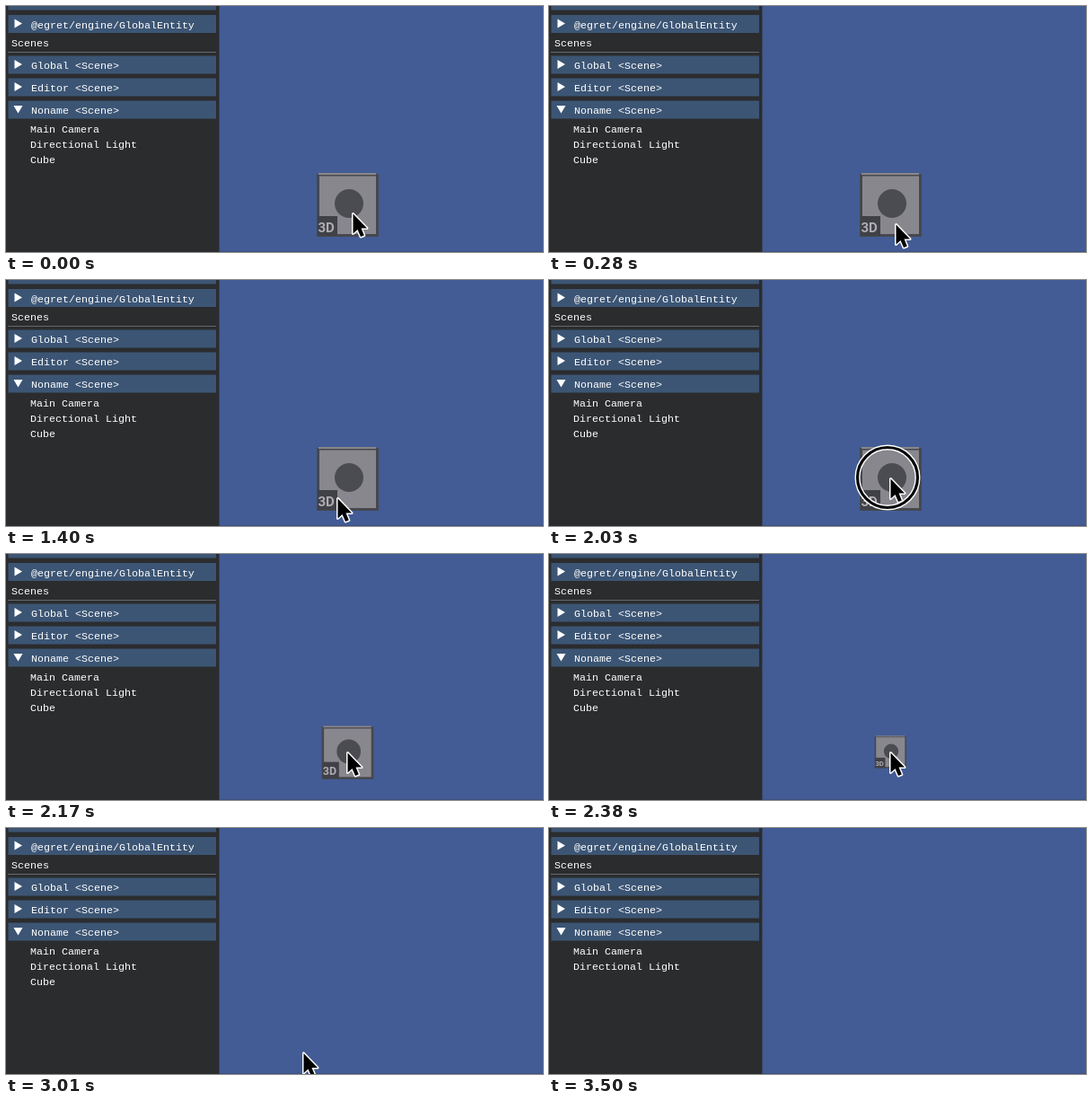
Animation, 598 px wide and 274 px high, one loop 3850 ms. Source, as an HTML page with a canvas:

```html
<!DOCTYPE html>
<html lang="en">
<head>
<meta charset="utf-8">
<title>Scene hierarchy</title>
<style>
  html, body { margin: 0; width: 100%; height: 100%; overflow: hidden; background: #435c95; }
  canvas { display: block; }
</style>
</head>
<body>
<canvas id="stage" width="598" height="274"></canvas>
<script>
const ctx = document.getElementById('stage').getContext('2d');
const LOOP = 3850, STEP = 70;
const BAR = '#3c5574', SCENE = '#435c95';
const arrow = new Path2D('M0 0V22L5 17.5L8.5 25.5L12.3 24L9 16H15.5Z');

const progress = (t, from, to) => Math.min(Math.max((t - from) / (to - from), 0), 1);
const easeOut = u => 1 - (1 - u) ** 2;

function rect(x, y, w, h, color) {
  ctx.fillStyle = color;
  ctx.fillRect(x, y, w, h);
}

function text(string, x, y, font = '11.67px "Liberation Mono", monospace', color = '#fff') {
  ctx.font = font;
  ctx.fillStyle = color;
  ctx.fillText(string, x, y);
}

function header(y, label, open) {
  rect(2.5, y + 0.5, 231.5, 20, BAR);
  ctx.save();
  ctx.translate(13.5, y + 10);
  if (open) ctx.rotate(Math.PI / 2);
  ctx.fillStyle = '#fff';
  ctx.fill(new Path2D('M-4 -5L4.5 0L-4 5Z'));
  ctx.restore();
  text(label, 28, y + 15);
}

function drawPanel(t) {
  rect(0, 0, 237.5, 274, '#2b2c2e');
  rect(2.5, 0, 231.5, 4.5, BAR);
  header(9.5, '@egret/engine/GlobalEntity');
  text('Scenes', 6, 45);
  rect(2, 51, 232, 1, '#66686c');
  ['Global', 'Editor', 'Noname'].forEach((name, i) =>
    header(55 + 25 * i, `${name} <Scene>`, name === 'Noname'));
  const children = ['Main Camera', 'Directional Light'];
  if (t < 3080) children.push('Cube');
  children.forEach((name, i) => text(name, 27, 141 + 17 * i));
}

function drawCube(t) {
  const scale = 1 - easeOut(progress(t, 2080, 3130));
  if (scale < 0.014) return;
  ctx.save();
  ctx.translate(380, 222 - 2.5 * (1 - scale));
  ctx.scale(scale, scale);
  rect(-34, -35, 69, 70, '#46474f');
  rect(-32, -36, 64, 2, '#8b8787');
  rect(-31, -32.5, 63, 64.5, '#89878e');
  ctx.beginPath();
  ctx.arc(2, -2, 16, 0, 2 * Math.PI);
  ctx.fillStyle = '#4b4c51';
  ctx.fill();
  rect(-33, 12, 22, 22, '#404147');
  text('3D', -32.5, 29.5, 'bold 15px Roboto, sans-serif', '#aeacb3');
  ctx.restore();
}

function drawRing() {
  ctx.beginPath();
  ctx.arc(377, 220, 33.5, 0, 2 * Math.PI);
  ctx.strokeStyle = '#fff';
  ctx.lineWidth = 6;
  ctx.stroke();
  ctx.strokeStyle = '#050608';
  ctx.lineWidth = 3.2;
  ctx.stroke();
}

// The pointer drops out of view, returns to click the cube, then drifts away.
function cursorAt(t) {
  if (t < 1400) return [386, 230 + 48 * progress(t, 0, 560) ** 2];
  const arrive = easeOut(progress(t, 1400, 1750));
  const leave = progress(t, 2450, 3150);
  const sink = progress(t, 3290, 3500);
  return [369 + 11 * arrive - 67 * leave ** 1.4,
          242 - 22 * arrive + 46 * leave ** 2 + 12 * sink];
}

function drawCursor(t) {
  const [x, y] = cursorAt(t);
  ctx.save();
  ctx.translate(x + 0.5, y + 1.5);
  ctx.strokeStyle = '#fff';
  ctx.lineWidth = 3;
  ctx.lineJoin = 'round';
  ctx.stroke(arrow);
  ctx.fillStyle = '#000';
  ctx.fill(arrow);
  ctx.restore();
}

function frame(now) {
  const t = Math.floor(now % LOOP / STEP) * STEP;
  rect(0, 0, 598, 274, SCENE);
  rect(238, 273, 360, 1, '#3c5080');
  drawPanel(t);
  drawCube(t);
  if (t >= 1820 && t < 2170) drawRing();
  drawCursor(t);
  requestAnimationFrame(frame);
}
requestAnimationFrame(frame);
</script>
</body>
</html>
```
